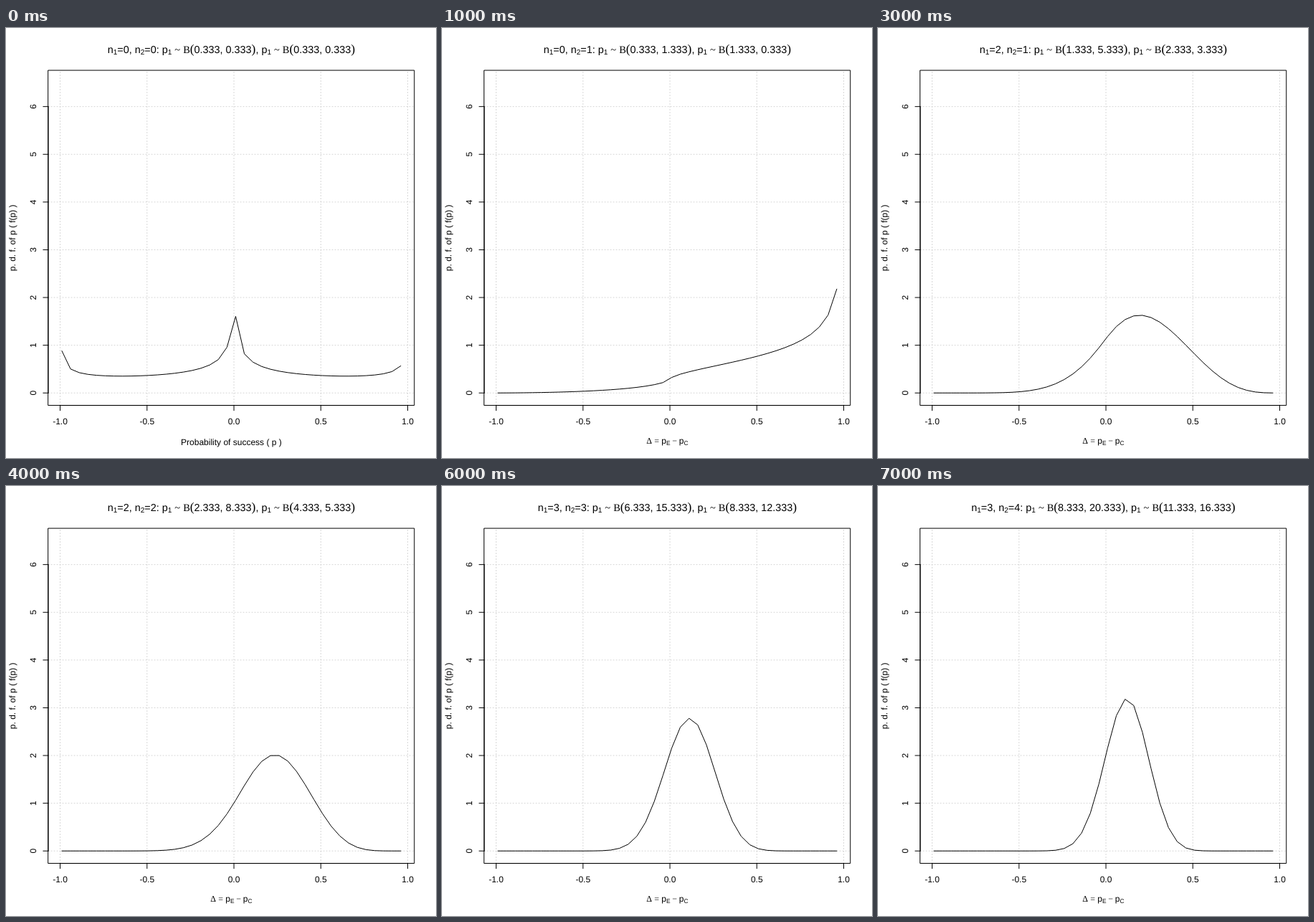
Recreate the animation shown at these times as an HTML page. Size 600x600 px, loop 8 s.

```html
<!DOCTYPE html>
<html lang="en">
<head>
<meta charset="utf-8">
<title>Density of the difference of two beta variables</title>
<style>
  html, body { margin: 0; width: 100%; height: 100%; overflow: hidden; background: #fff; }
  svg { display: block; width: 600px; height: 600px; }
  text { font: 12px "Liberation Sans", Arial, sans-serif; text-anchor: middle; text-rendering: geometricPrecision; white-space: pre; }
  #title { font-size: 14.4px; }
  .sub { font-size: 0.7em; }
  .sym { font-family: "Liberation Serif", Times, serif; }
  .paren { font-family: "Liberation Serif", Times, serif; font-size: 17.5px; }
  path, rect { fill: none; stroke: #000; stroke-width: 1; stroke-linecap: round; stroke-linejoin: round; }
  #grid { stroke: #d3d3d3; stroke-dasharray: 1 3; }
</style>
</head>
<body>
<svg viewBox="0 0 600 600">
  <path id="grid"/>
  <path id="curve"/>
  <path id="axes"/>
  <rect x="59.04" y="59.04" width="510.72" height="467.52"/>
  <g id="labels"></g>
  <text id="title" x="314.4" y="35"></text>
  <text id="xlab" x="314.4"></text>
  <text transform="translate(12.96 292.8) rotate(-90)">p. d. f. of p ( f(p) )</text>
</svg>
<script>
const $ = id => document.getElementById(id);
const LEFT = 59.04, RIGHT = 569.76, TOP = 59.04, BOTTOM = 526.56, TICK = 7.2;
const STEP_MS = 1000;
const px = x => LEFT + (x + 1.068) * (RIGHT - LEFT) / 2.106;
const py = y => BOTTOM - (y + 0.26) * (BOTTOM - TOP) / 7.02;

// n1, n2, then successes and failures counted for each arm
const STEPS = [
  [0, 0, 0, 0, 0, 0],
  [0, 1, 0, 1, 1, 0],
  [1, 1, 0, 3, 1, 1],
  [2, 1, 1, 5, 2, 3],
  [2, 2, 2, 8, 4, 5],
  [3, 2, 4, 11, 6, 8],
  [3, 3, 6, 15, 8, 12],
  [3, 4, 8, 20, 11, 16]
];

// Integral of f(u, 1 - u) over 0..1, with a logistic substitution for the end singularities
function integrate(f) {
  const h = 0.2;
  let sum = 0;
  for (let s = -50; s <= 50; s += h) {
    const u = 1 / (1 + Math.exp(-s)), v = 1 / (1 + Math.exp(s));
    sum += f(u, v) * u * v;
  }
  return sum * h;
}

const kernel = (p, q, a, b) => Math.pow(p, a - 1) * Math.pow(q, b - 1);
const beta = (a, b) => integrate((u, v) => kernel(u, v, a, b));

// Density of pE - pC at d
function density(d, [a1, b1, a2, b2]) {
  const gap = Math.abs(d), w = 1 - gap;
  return w * integrate((u, v) => {
    const lo = w * u, hi = w * v;
    return d >= 0
      ? kernel(lo, gap + hi, a1, b1) * kernel(gap + lo, hi, a2, b2)
      : kernel(gap + lo, hi, a1, b1) * kernel(lo, gap + hi, a2, b2);
  });
}

function curvePath(shape) {
  const norm = beta(shape[0], shape[1]) * beta(shape[2], shape[3]);
  let d = "";
  for (let i = 0; i < 40; i++) {
    const x = -0.99 + i * 0.05;
    d += (i ? "L" : "M") + px(x).toFixed(2) + " " + py(density(x, shape) / norm).toFixed(2);
  }
  return d;
}

const span = (cls, text, dx = 0, dy = 0) =>
  `<tspan class="${cls}" dx="${dx}" dy="${dy}">${text}</tspan>`;
// A subscript followed by text back on the baseline
const sub = (s, next, drop, cls = "", dx = 0) =>
  span("sub", s, 0, drop) + span(cls, next, dx, -drop);

function titleText([n1, n2, ...c]) {
  const v = c.map(k => k + ".333");
  const dist = (a, b) => sub("1", "~", 2.2, "sym", 4) + span("sym", "B", 4) +
    span("paren", "(") + `${a}, ${b}` + span("paren", ")");
  return "n" + sub("1", `=${n1}, n`, 2.2) + sub("2", `=${n2}: p`, 2.2) +
    dist(v[0], v[1]) + ", p" + dist(v[2], v[3]);
}

const DELTA = span("sym", "Δ") + span("sym", "=", 3.3) + span("", "p", 3.3) +
  sub("E", "−", 1.8, "sym", 2.7) + span("", "p", 2.7) + span("sub", "C", 0, 1.8);

function drawFrame() {
  let grid = "", axes = `M${px(-1)} ${BOTTOM}H${px(1)}M${LEFT} ${py(0)}V${py(6)}`, labels = "";
  for (let x = -1; x <= 1; x += 0.5) {
    grid += `M${px(x)} ${BOTTOM}V${TOP}`;
    axes += `M${px(x)} ${BOTTOM}v${TICK}`;
    labels += `<text x="${px(x)}" y="552.8">${x.toFixed(1)}</text>`;
  }
  for (let y = 0; y <= 6; y++) {
    grid += `M${LEFT} ${py(y)}H${RIGHT}`;
    axes += `M${LEFT} ${py(y)}h${-TICK}`;
    labels += `<text transform="translate(41.76 ${py(y)}) rotate(-90)">${y}</text>`;
  }
  $("grid").setAttribute("d", grid);
  $("axes").setAttribute("d", axes);
  $("labels").innerHTML = labels;
}

const paths = STEPS.map(s => curvePath(s.slice(2).map(k => k + 1 / 3)));
let shown = -1;

function show(t) {
  const i = Math.floor(t / STEP_MS) % STEPS.length;
  if (i === shown) return;
  shown = i;
  $("curve").setAttribute("d", paths[i]);
  $("title").innerHTML = titleText(STEPS[i]);
  $("xlab").innerHTML = i ? DELTA : "Probability of success ( p )";
  $("xlab").setAttribute("y", i ? 580 : 581.5);
}

function tick(t) {
  show(t);
  requestAnimationFrame(tick);
}

drawFrame();
show(0);
requestAnimationFrame(tick);
</script>
</body>
</html>
```
